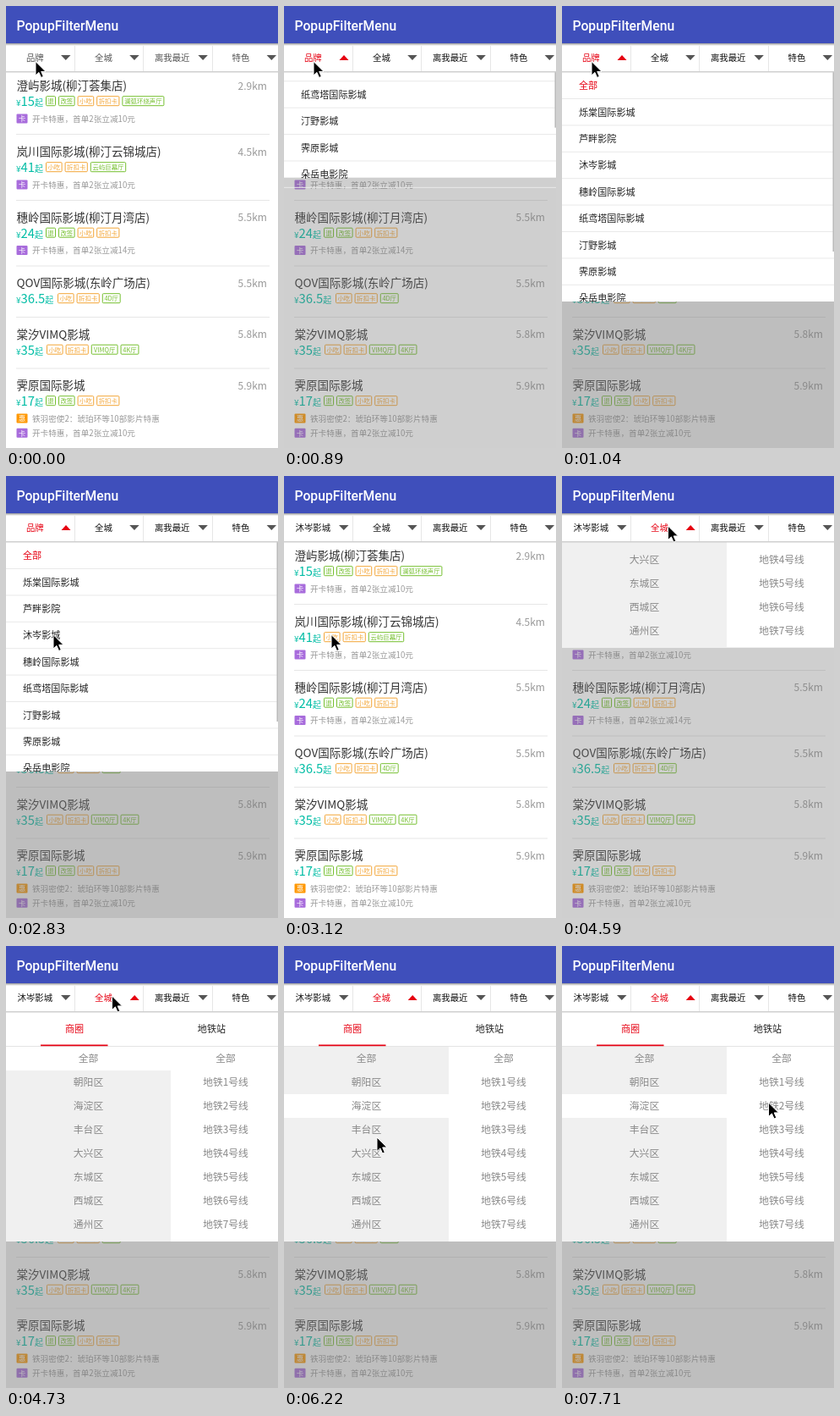
These frames come from a looping animation (322 px wide and 522 px high, 8 s). An HTML page:

```html
<!DOCTYPE html>
<html lang="zh-CN">
<head>
<meta charset="utf-8">
<title>PopupFilterMenu</title>
<style>
  html, body { margin: 0; width: 100%; height: 100%; overflow: hidden; background: #fff; }
  svg { display: block; width: 100%; height: 100%; }
  text { font-family: "Noto Sans CJK SC", "Noto Sans CJK", sans-serif; white-space: pre; }
  .bar { font-family: Roboto, sans-serif; font-weight: 500; }
</style>
</head>
<body>
<svg viewBox="0 0 322 522">
  <defs>
    <clipPath id="window"><rect y="78" width="322" height="271"/></clipPath>
    <linearGradient id="shade" x2="0" y2="1">
      <stop stop-color="#999"/><stop offset="1" stop-color="#fff"/>
    </linearGradient>
  </defs>
  <rect width="322" height="522" fill="#fff"/>
  <g id="list"></g>
  <rect id="dim" y="78" width="322" height="444" fill="#757575"/>
  <g clip-path="url(#window)">
    <g id="brands"></g>
    <g id="areas"></g>
  </g>
  <g id="tabs"></g>
  <rect width="322" height="44" fill="#3f4fbb"/>
  <rect y="44" width="322" height="3" fill="url(#shade)"/>
  <text class="bar" x="12.5" y="28.8" font-size="15.7" fill="#fff">PopupFilterMenu</text>
  <path id="cursor" d="M0 0V16.5L3.9 12.9L6.6 19L9.3 17.8L6.7 11.9H12Z" fill="#000" stroke="#fff"/>
</svg>
<script>
const RED = '#e60012', GREEN = '#74bf2e', ORANGE = '#f3a536', TEAL = '#00bda5', PURPLE = '#a86cdc';
const TICK = 147.9, LOOP = 8000;
const $ = id => document.getElementById(id);

const rect = (x, y, w, h, fill, more = '') =>
  `<rect x="${x}" y="${y}" width="${w}" height="${h}" fill="${fill}" ${more}/>`;
// y is the optical middle of the line
const text = (s, x, y, size, fill, anchor = 'start') =>
  `<text x="${x}" y="${y + size * .38}" font-size="${size}" fill="${fill}" text-anchor="${anchor}">${s}</text>`;

// ---- cinema list ----
const cinemas = [
  { y: 94, name: '澄屿影城(柳汀荟集店)', km: 2.9, price: '15', tagX: 47, tags: '退 改签 小吃 折扣卡 澜弧环绕声厅', notes: ['卡开卡特惠，首单2张立减10元'] },
  { y: 172, name: '岚川国际影城(柳汀云锦城店)', km: 4.5, price: '41', tagX: 47, tags: '小吃 折扣卡 云屿巨幕厅', notes: ['卡开卡特惠，首单2张立减10元'] },
  { y: 249.5, name: '穗岭国际影城(柳汀月湾店)', km: 5.5, price: '24', tagX: 47, tags: '退 改签 小吃 折扣卡', notes: ['卡开卡特惠，首单2张立减14元'] },
  { y: 327, name: 'QOV国际影城(东岭广场店)', km: 5.5, price: '36.5', tagX: 61, tags: '小吃 折扣卡 4D厅', notes: [] },
  { y: 387.5, name: '棠汐VIMQ影城', km: 5.8, price: '35', tagX: 48, tags: '小吃 折扣卡 VIMQ厅 4K厅', notes: [] },
  { y: 448, name: '霁原国际影城', km: 5.9, price: '17', tagX: 47, tags: '退 改签 小吃 折扣卡', notes: ['惠铁羽密使2：琥珀环等10部影片特惠', '卡开卡特惠，首单2张立减10元'] }
];

function tagRow(tags, x, y) {
  return tags.split(' ').map(tag => {
    const ems = [...tag].reduce((sum, c) => sum + (c > '\u00ff' ? 1 : .65), 0);
    const w = ems * 7.6 + 4.4;
    const color = /小吃|折扣卡/.test(tag) ? ORANGE : GREEN;
    const out = rect(x + .5, y - 5.5, w - 1, 11, 'none', `stroke="${color}" rx="1"`) +
      text(tag, x + w / 2, y, 7.4, color, 'middle');
    x += w + 3;
    return out;
  }).join('');
}

function cinemaRow({ y, name, km, price, tagX, tags, notes }) {
  const noteRows = notes.map((note, i) => {
    const ny = y + 39 + i * 17.3;
    return rect(12.5, ny - 5.5, 13, 11, note[0] === '卡' ? PURPLE : '#ff9800', 'rx="1"') +
      text(note[0], 19, ny, 8.5, '#fff', 'middle') +
      text(note.slice(1), 31, ny, 9.65, '#999');
  }).join('');
  const lineY = y + (notes.length ? 57 : 40);
  return text(name, 12.5, y, 13.5, '#333') +
    text(km + 'km', 309, y, 12, '#999', 'end') +
    `<text x="12" y="${y + 24}" font-size="10" fill="${TEAL}">¥<tspan font-size="14.8">${price}</tspan>起</text>` +
    tagRow(tags, tagX, y + 18.2) + noteRows +
    (lineY < 500 ? rect(12, lineY, 300, 1, '#e6e6e6') : '');
}
$('list').innerHTML = cinemas.map(cinemaRow).join('');

// ---- brand panel ----
const brands = ['全部', '烁棠国际影城', '芦畔影院', '沐岑影城', '穗岭国际影城', '纸鸢塔国际影城', '汀野影城', '霁原影城', '朵岳电影院'];
$('brands').innerHTML = rect(0, 78, 322, 271, '#fff') +
  brands.map((name, i) =>
    text(name, 20, 94 + i * 31.4, 11.1, i ? '#222' : RED) +
    rect(0, 109 + i * 31.4, 322, 1, '#e9e9e9')).join('') +
  rect(320.5, 78, 1.5, 212, '#bbb');

// ---- area panel ----
const areas = ['全部', '朝阳区', '海淀区', '丰台区', '大兴区', '东城区', '西城区', '通州区'];
function areaPanel(selected) {
  return rect(0, 78, 322, 271, '#fff') +
    text('商圈', 81, 98, 11.1, RED, 'middle') +
    text('地铁站', 243.5, 98, 11.1, '#222', 'middle') +
    rect(0, 118, 322, 1, '#e4e4e4') +
    rect(41, 116.5, 79.5, 1.7, RED) +
    rect(0, 119, 195, 230, '#f0f0f0') +
    rect(0, 119 + selected * 28, 195, 28, '#fff') +
    areas.map((name, i) =>
      text(name, 97.5, 133 + i * 28, 11.8, '#888', 'middle') +
      text(i ? `地铁${i}号线` : name, 260, 133 + i * 28, 11.8, '#888', 'middle')).join('');
}

// ---- filter tabs ----
function tabBar(labels, active, color) {
  return rect(0, 44, 322, 33, '#fff') + rect(0, 77, 322, 1.5, '#cfcfcf') +
    labels.map((label, i) => {
      const x = i * 81.2, on = i === active;
      const arrow = on ? `M${x + 65.5} 64l5.5 -6l5.5 6z` : `M${x + 65} 58h11.5l-5.75 6z`;
      return text(label, x + 34.3, 61, 10.4, on ? RED : color, 'middle') +
        `<path d="${arrow}" fill="${on ? RED : '#555'}"/>` +
        (i ? rect(Math.round(x), 46, 1, 31, '#e6e6e6') : '');
    }).join('');
}

// ---- motion, in ticks ----
const pointer = [
  [0, 35, 65.5], [13, 35, 65.5], [17, 56, 187.5], [21, 56, 187.5], [26, 118, 65], [27, 125.5, 59],
  [32, 125.5, 59], [37, 118, 186], [38, 118, 186], [39, 111, 231], [40, 111, 231],
  [41, 114, 238], [45, 98, 190], [46, 98, 190], [52, 244.5, 185], [60, 244.5, 185]
];
function pointerAt(n) {
  const i = pointer.findIndex(key => key[0] > n);
  const [n0, x0, y0] = pointer[i - 1], [n1, x1, y1] = pointer[i];
  const k = (n - n0) / (n1 - n0);
  return [x0 + (x1 - x0) * k, y0 + (y1 - y0) * k];
}

// 0 closed, 1 open; each slide takes two ticks
const slide = n => n <= 0 ? 0 : n < 2 ? .46 : 1;

function place(id, open) {
  $(id).setAttribute('transform', `translate(0 ${-271 * (1 - open)})`);
  $(id).style.display = open ? '' : 'none';
}

function draw(n) {
  const brandOpen = n < 19 ? slide(n - 5) : slide(21 - n);
  const areaOpen = slide(n - 30);
  const active = n >= 5 && n < 20 ? 0 : n >= 30 ? 1 : -1;
  $('areas').innerHTML = areaPanel(n >= 37 ? 2 : 0);
  place('brands', brandOpen);
  place('areas', areaOpen);
  $('dim').setAttribute('opacity', .47 * Math.min(1, 1.6 * Math.max(brandOpen, areaOpen)));
  $('tabs').innerHTML = tabBar([n < 20 ? '品牌' : '沐岑影城', '全城', '离我最近', '特色'], active, n < 5 ? '#555' : '#111');
  $('cursor').setAttribute('transform', `translate(${pointerAt(n)})`);
}

let shown = -1;
function frame() {
  const n = Math.floor((performance.now() % LOOP + 8) / TICK);
  if (n !== shown) draw(shown = n);
  requestAnimationFrame(frame);
}
frame();
</script>
</body>
</html>
```
